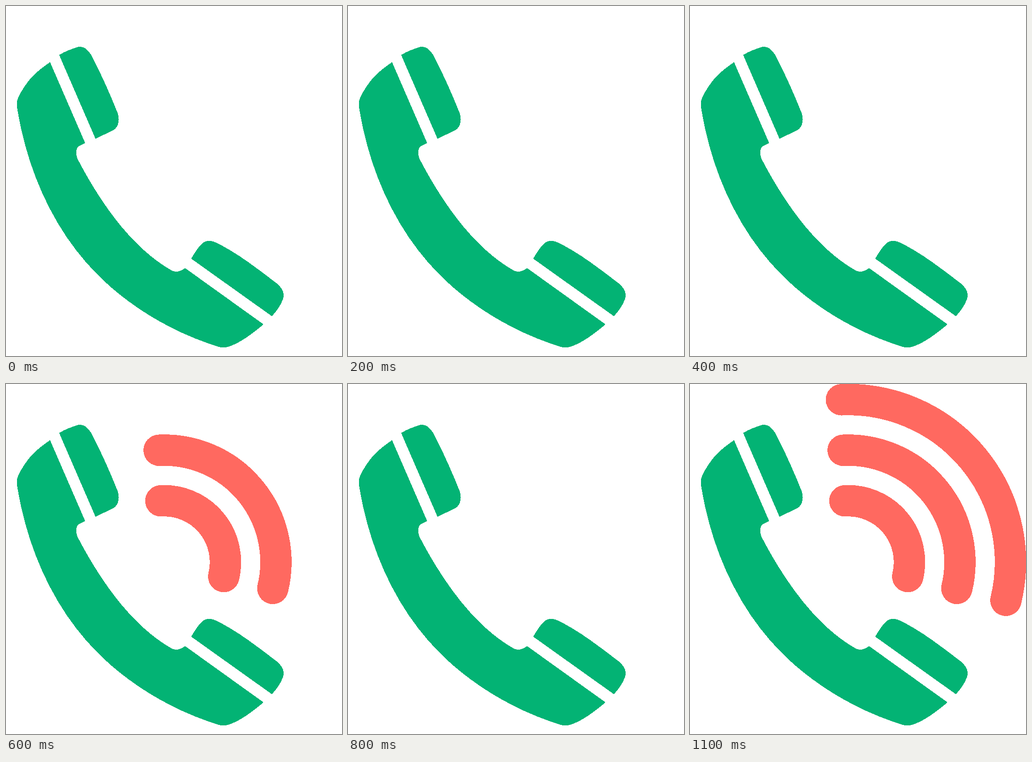
An HTML page that plays this animation: 702 px wide and 730 px high, repeating every 1200 ms.

```html
<!DOCTYPE html>
<html lang="en">
<head>
<meta charset="utf-8">
<title>Ringing phone</title>
<style>
  html, body { margin: 0; width: 100%; height: 100%; overflow: hidden; background: #fff; }
  svg { display: block; width: 702px; height: 730px; shape-rendering: crispEdges; }
</style>
</head>
<body>
<svg viewBox="0 0 702 730">
  <g id="phone" fill="#03b374">
    <path d="M92 117L165.500 286L153 292C146 296 145 307 149.500 319C205 425 270 508 345 551
      C353 556 363 555 374 546.500L538 664C508 690 475 711 455 712.500Q450 712.500 445 711
      C346 681 253 624 187 556C100 467 45 346 23.500 214Q21.500 200 25 192
      C31 178 43 161 53 149C63 138 78 127 92 117Z"/>
    <path d="M111 102C123 95 136 90 148 86C160 82 170 89 178 102C199 142 218 185 234 225
      C238 240 234 253 225 258.500L187 277Z"/>
    <path d="M387 527C394 515 401 504 409 496C418 488 428 488 440 494C483 515 523 546 565 578
      C578 588 583 600 578.500 612C573 626 565 637 555.500 647Z"/>
  </g>
  <g id="waves" fill="none" stroke="#ff6960" stroke-width="65.5" stroke-linecap="round"></g>
</svg>
<script>
const STEP = 100, STEPS = 12, TILT = 7.5;
const CENTER = { x: 330.5, y: 371.5 };
const phone = document.getElementById('phone');
const waveGroup = document.getElementById('waves');

function pointOnWave(radius, degrees) {
  const a = degrees * Math.PI / 180;
  return `${CENTER.x + radius * Math.cos(a)} ${CENTER.y + radius * Math.sin(a)}`;
}

function addWave(radius, startAngle) {
  const path = document.createElementNS('http://www.w3.org/2000/svg', 'path');
  path.setAttribute('d',
    `M${pointOnWave(radius, startAngle)}A${radius} ${radius} 0 0 1 ${pointOnWave(radius, 13.6)}`);
  waveGroup.append(path);
  return path;
}

const waves = [addWave(128, -93.1), addWave(233.5, -92.6), addWave(339, -92.4)];

// The phone shakes once each way, then the waves build up twice.
function render(time) {
  const step = Math.floor(time / STEP) % STEPS;
  const angle = step === 1 ? TILT : step === 3 ? -TILT : 0;
  const visible = step < 4 ? 0 : step % 4;
  phone.setAttribute('transform', `rotate(${angle} 301 398.5)`);
  waves.forEach((wave, i) => wave.setAttribute('visibility', i < visible ? 'visible' : 'hidden'));
}

const start = performance.now();
function tick() {
  render(performance.now() - start);
  requestAnimationFrame(tick);
}
tick();
</script>
</body>
</html>
```
